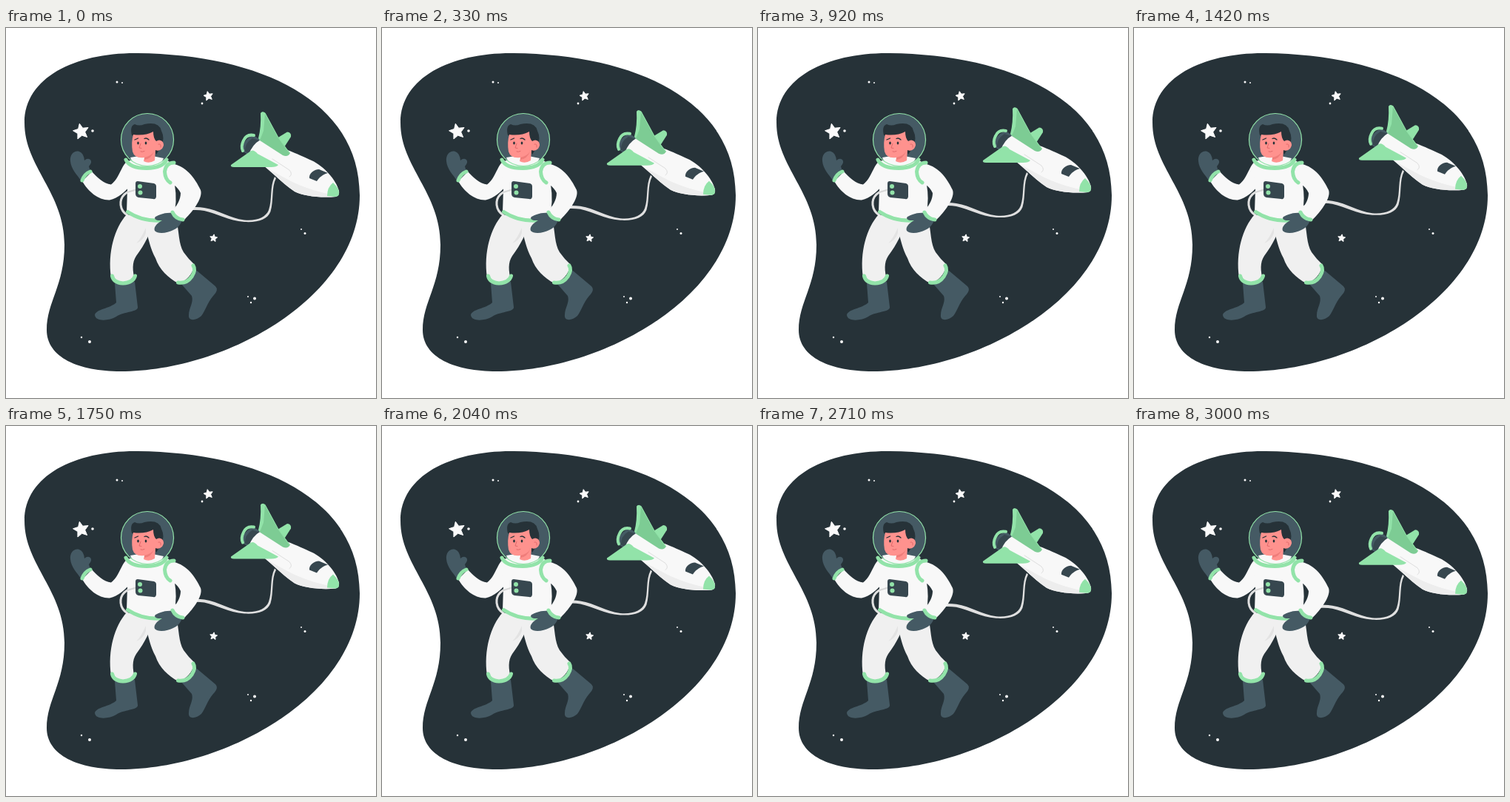
These frames come from a looping animation (500 px wide and 500 px high, 3040 ms). An HTML page:

```html
<!DOCTYPE html>
<html lang="en">
<head>
<meta charset="utf-8">
<title>Spacewalk</title>
<style>
html, body { margin: 0; width: 100%; height: 100%; overflow: hidden; background: #fff; }
svg { display: block; width: 100vw; height: 100vh; }
.white { fill: #f8f8f8; }
.soft { fill: #f0f0f0; }
.shade { fill: #e3e3e3; }
.green { fill: #92e3a9; }
.night { fill: #263238; }
.steel { fill: #37474f; }
.slate { fill: #455a64; }
.skin { fill: #ff928e; }
.line { fill: none; stroke-linecap: round; stroke-linejoin: round; }
.trim { stroke: #92e3a9; stroke-width: 5; }
.fine { stroke: #263238; stroke-width: 1.3; }
.crease { stroke: #dedede; stroke-width: 1; }
</style>
</head>
<body>
<svg viewBox="0 0 500 500">
  <path class="night" d="M178 34C95 33 25 66 25 128C25 188 79 222 79 293C79 348 55 370 55 408C55 445 98 464 155 464C300 464 478 362 478 226C478 98 343 36 178 34Z"/>
  <g id="sky" fill="#fafafa" stroke="#fafafa" stroke-linejoin="round"></g>

  <g id="ship">
    <path fill="#e0e0e0" d="M228 250C240 242 255 241 268 243C288 246 302 257 322 259.500C339 261 351 256 355 246C360 232 356 215 363 201L365 203C358.500 215 362 233 357.500 248C353 259 341 263 322 262C300 260 286 251 268 247C255 245 240 246 228 254Z"/>
    <!-- far wing and engine -->
    <path class="green" d="M366 149L380 140.500Q386 141 385 147L376 161Z"/>
    <path class="slate" d="M334 145L346 152L332 174L320 167Q318 152 334 145Z"/>
    <path class="steel" d="M333 149L342 152Q333 160 331 171L323 167Q322 156 333 149Z"/>
    <path class="line" stroke="#92e3a9" stroke-width="4" d="M335 145Q325 143 321 152Q317 160 320 166"/>
    <!-- hull -->
    <path class="white" d="M344 151C365 158 396 171 413 179C430 187 446 205 450 220Q451 226 446 228C424 230 402 227 390 221C371 208 351 186 328 171Q333 157 344 151Z"/>
    <path fill="#ededed" d="M355 191C374 200 392 215 439 225L446 228C424 230 402 227 390 221C376 212 367 202 355 191Z"/>
    <path class="line crease" d="M360 177L383 192Q388 198 383 201"/>
    <path class="green" d="M442 209Q451 217 450 224Q450 228 444 228L434 227Q434 215 442 209Z"/>
    <path class="steel" d="M410 203C409 197 416 191 423 191L435 196C428 198 423 202 420 207Z"/>
    <!-- near wing and tail fin -->
    <path class="green" d="M304 185L331 166Q335 164 340 170L368 185Q366 188 358 188L308 188Q303 188 304 185Z"/>
    <path fill="#7dcc94" d="M345 114Q349 112 351 116L368 148L384 169Q381 175 374 172L343 152Q346 135 345 114Z"/>
    <path class="green" d="M344 115Q346 112 350 115L348 139L343 152L341 149Q345 134 344 115Z"/>
    <path class="line" stroke="#92e3a9" stroke-width="1" d="M350 115L368 148L383 169"/>
  </g>

  <path class="line" stroke="#e0e0e0" stroke-width="3" d="M177 219C162 219 154 228 155 239Q156 248 164 253"/>

  <!-- boots -->
  <path class="slate" d="M147 345L174 343L178 377C179 384 159 383 149 390C139 396 121 397 120 388C121 380 141 379 149 371Z"/>
  <path class="slate" d="M237 346L258 328L283 349Q288 354 280 362C272 371 269 383 264 389C258 395 246 397 247 388C247 378 254 371 251 362Z"/>
  <!-- legs -->
  <path class="soft" d="M186 260L230 258C234 274 233 292 240 303Q247 313 255 320Q250 340 233 345C219 338 207 326 202 311C195 298 193 286 189 273Z"/>
  <path class="soft" d="M163 252L200 260C195 277 188 292 176 308C170 317 171 328 174 340Q158 350 142 337C137 303 147 270 163 252Z"/>
  <path class="shade" d="M189 270Q183 284 176 291Q186 287 189 277Z"/>
  <path class="line trim" d="M143.500 335Q145 344 158 345Q172 344 174.500 335"/>
  <path class="line trim" d="M232.500 344Q244 346 251 336Q257 327 253 321"/>

  <!-- waving arm -->
  <path class="white" d="M166 179C156 183 154 203 142 211.500C132 210 124 203 116 194L103 207C111 221 125 233 140 232.500C152 230 161 221 168 213Z"/>
  <path class="slate" d="M101 206C96 198 88 191 87 180C86 170 93 165 99 167Q105 169 106 179Q110 175 114 178Q117 181 112 187L114 194Z"/>
  <path class="line trim" d="M103 206Q106 197 114 194"/>

  <!-- torso -->
  <path class="white" d="M163 180Q190 174 218 179C229 185 230 199 228 212Q232 235 226 257Q196 271 163 249L164 218Q161 198 163 180Z"/>
  <path class="line trim" d="M164.500 248.500Q184 262 213 260"/>
  <path class="line" stroke="#d8d8d8" stroke-width="2" d="M164 222L177 218"/>
  <path class="steel" d="M178 207L200 210Q203 211 203 214L203 228Q202 232 199 231L179 229Q175 228 175 224L175 210Q175 207 178 207Z"/>
  <g class="green"><circle cx="181" cy="214" r="3"/><circle cx="181.500" cy="222.500" r="3"/></g>

  <!-- resting arm -->
  <path class="white" d="M223 183C243 186 255 202 263 219C267 230 250 251 240 260L223 248C231 241 236 232 236 223C232 214 224 210 219 207C211 200 214 186 223 183Z"/>
  <path class="line trim" d="M227 182Q216 182 214.500 194Q215 205 222 209"/>
  <path class="slate" d="M225 250C213 249 207 253 202 255Q199 258 205 260L211 260C204 264 199 269 201 274C205 279 219 277 226 273C233 270 236 265 238 260Z"/>
  <path class="line trim" d="M225 249Q229 258 239 259"/>

  <!-- helmet and head -->
  <circle class="slate" cx="191" cy="151" r="35.500"/>
  <path class="white" d="M168 175Q190 170 213 176Q208 188 190 189Q172 187 168 175Z"/>
  <path class="night" d="M170 145Q167 132 174 130Q180 133 187 130Q207 126 210 139Q215 149 210 160L203 171L194 150Z"/>
  <path class="skin" d="M172 144Q188 146 199 140Q199 149 203 153Q207 150 211 153Q215 157 211 163Q207 167 202 165L201 179Q193 184 186 180L187 175Q174 177 171 167Q169 154 172 144Z"/>
  <path fill="#ef7d7a" d="M187 175Q196 173 200 167Q196 177 187 178Z"/>
  <g class="night"><ellipse cx="178.500" cy="155.500" rx="1.300" ry="1.900"/><ellipse cx="189" cy="155.500" rx="1.300" ry="1.900"/></g>
  <path class="line fine" d="M174 151L178.500 149M187 149.500Q190 148 193 151"/>
  <path class="line" stroke="#e0696a" d="M182 156L180 162L183 162.500M182 167Q184 168 187 166.500M206 157Q210 156 209 161"/>
  <path class="line trim" d="M162 178Q167 189.500 190 189.500Q212 189 217 178"/>
  <circle class="line" cx="191" cy="151" r="35.500" stroke="#92e3a9" stroke-width="1.200"/>
</svg>
<script>
const LOOP = 3040, LIFT = 10;
const sky = document.getElementById('sky');
const ship = document.getElementById('ship');

function star(x, y, r, tilt) {
  const points = Array.from({ length: 10 }, (_, i) => {
    const a = tilt + i * Math.PI / 5 - Math.PI / 2;
    const d = i % 2 ? r * 0.48 : r;
    return (x + d * Math.cos(a)).toFixed(2) + ',' + (y + d * Math.sin(a)).toFixed(2);
  });
  return `<polygon points="${points.join(' ')}"/>`;
}
const dot = (x, y, r) => `<circle cx="${x}" cy="${y}" r="${r}" stroke="none"/>`;

sky.innerHTML =
  [[101.5, 140, 11, -0.2], [273.5, 92, 6.5, -0.2], [280.5, 284, 5.2, 0.12]].map(s => star(...s)).join('') +
  [[150, 73, 1.5], [157, 74, 1], [117, 139, 1.8], [265, 102, 1.4], [399, 272, 1], [404, 277.5, 1.5],
   [327, 363, 1], [336, 365.5, 2], [331, 371, 1.2], [102, 418, 1.2], [113, 424, 2]].map(d => dot(...d)).join('');

// The ship and its tether rise and sink together at constant speed.
const start = performance.now();
function draw(now) {
  const phase = Math.max(0, now - start) % LOOP / LOOP;
  const rise = LIFT * (1 - Math.abs(1 - 2 * phase));
  ship.setAttribute('transform', `translate(0 ${-rise})`);
  requestAnimationFrame(draw);
}
draw(start);
</script>
</body>
</html>
```
